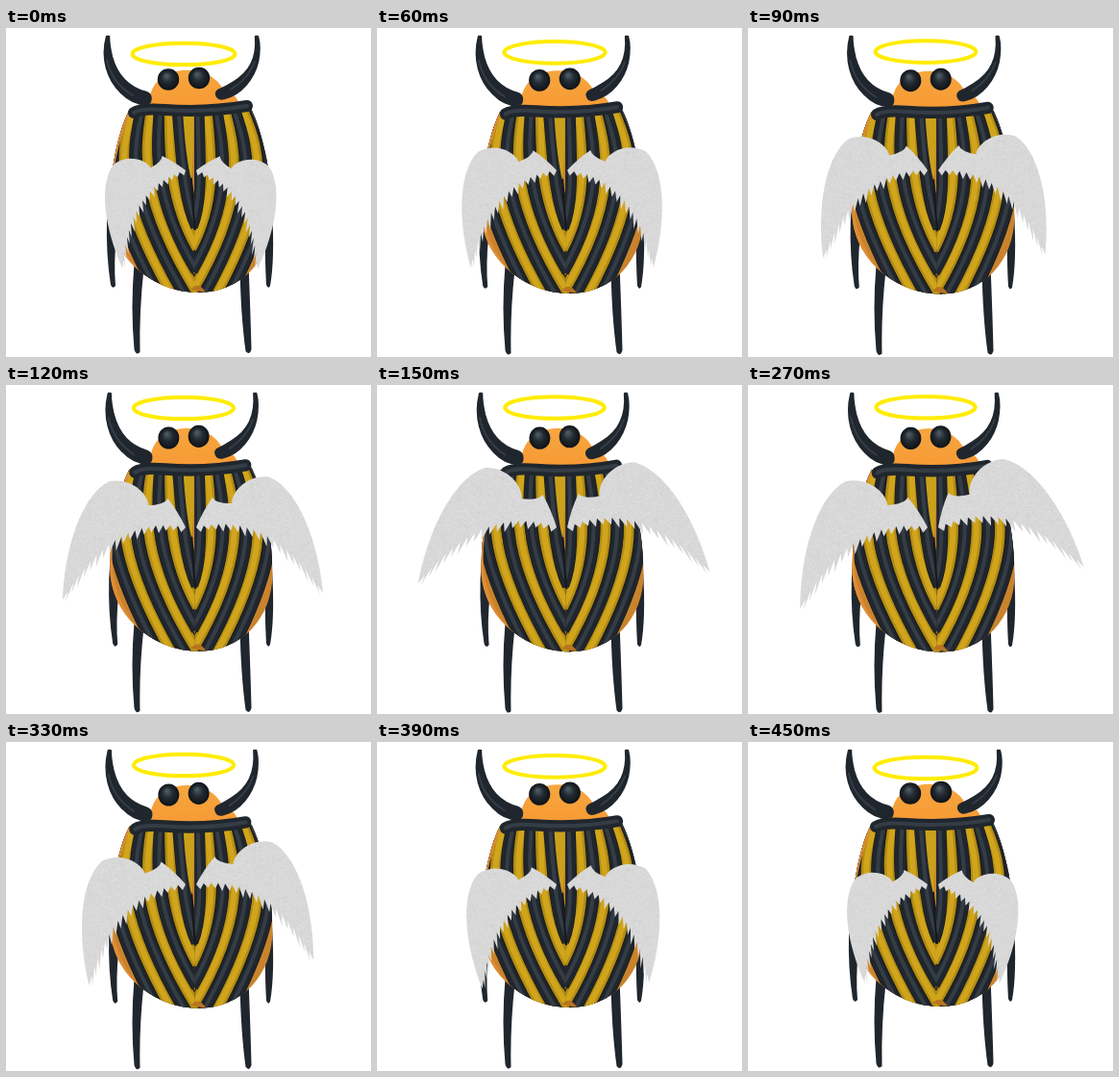
Animation of 380 by 342 pixels, one loop 480 ms. Source, as an HTML page with a canvas:

```html
<!DOCTYPE html>
<html lang="en">
<head>
<meta charset="utf-8">
<title>Winged beetle</title>
<style>
html, body { margin: 0; width: 100%; height: 100%; overflow: hidden; background: #fff; }
canvas { display: block; }
</style>
</head>
<body>
<canvas id="stage" width="380" height="342"></canvas>
<script>
const ctx = document.getElementById('stage').getContext('2d');
const LOOP = 480, STEP = 30, PEAK = 210, END = 450;
const DARK = '#20262d', SHEEN = '#343c45', ORANGE = '#f7a03c';

const mix = (a, b, u) => a + (b - a) * u;
const smooth = u => u * u * (3 - 2 * u);
const easeOut = u => 1 - (1 - u) ** 2;

function layer(draw) {
  ctx.save();
  draw();
  ctx.restore();
}

function fill(d, color) {
  ctx.fillStyle = color;
  ctx.fill(new Path2D(d));
}

function line(d, width, color) {
  ctx.lineWidth = width;
  ctx.strokeStyle = color;
  ctx.stroke(new Path2D(d));
}

function speckle() {
  const tile = document.createElement('canvas');
  tile.width = tile.height = 48;
  const c = tile.getContext('2d');
  c.fillStyle = '#d8d8d8';
  c.fillRect(0, 0, 48, 48);
  let seed = 7;
  const rnd = n => (seed = seed * 16807 % 2147483647) % n;
  for (let i = 0; i < 260; i++) {
    c.fillStyle = i % 2 ? '#dfdfdf' : '#d1d1d1';
    c.fillRect(rnd(48), rnd(48), 2, 1);
  }
  return ctx.createPattern(tile, 'repeat');
}

// Raised left wing with the shoulder at 0,0
function wingShape() {
  const path = new Path2D('M0 0 Q-3 -21 -10 -39 Q-16 -33 -34 -38 C-31 -52 -44 -76 -70 -79 C-107 -73 -145 -18 -165 39');
  const edge = u => [
    -165 * (1 - u) ** 2 - 154 * u * (1 - u),
    39 * (1 - u) ** 2 - 86 * u * (1 - u)
  ];
  const count = 19;
  for (let i = 0; i < count; i++) {
    const u = i / count, [x, y] = edge(u + .01);
    const lean = .62 * (1 - u), len = mix(18, 6, u) * (i % 3 ? .85 : 1.1);
    if (i) path.lineTo(x - Math.sin(lean) * len, y + Math.cos(lean) * len);
    path.lineTo(...edge(u + 1 / count));
  }
  path.closePath();
  return path;
}

const FEATHER = speckle(), WING = wingShape();

function wing(x, side, size, angle) {
  ctx.translate(x, 148);
  ctx.scale(side * size, size);
  ctx.rotate(-angle * Math.PI / 180);
  ctx.fillStyle = FEATHER;
  ctx.fill(WING);
}

// The left wing drops early, the right one hangs on and swings higher
function wings(t) {
  const up = t < PEAK, u = up ? t / PEAK : (t - PEAK) / (END - PEAK);
  const size = up ? mix(.715, 1, u) : mix(1, .715, u);
  const left = up ? mix(44, 0, smooth(u)) : mix(0, 44, easeOut(u));
  const right = up ? mix(45, -6, smooth(u)) : mix(-6, 45, smooth(u));
  layer(() => wing(187, 1, size, left));
  layer(() => wing(198, -1, size, right));
}

function legs(b) {
  ctx.translate(0, 2.5 * b);
  layer(() => {
    ctx.translate(3 * b, 0);
    fill('M107 165 L115 215 Q112 245 114 268 Q111 272 109 267 Q104 235 105 200Z', DARK);
  });
  fill('M270 180 L277 190 Q280 240 275 268 Q273 272 271 267 Q269 235 270 180Z', DARK);
  ctx.translate(-1.5, 0);
  fill('M135 245 L145 250 Q140 295 141 337 Q137 341 135 334 Q131 290 135 245Z', DARK);
  fill('M245 250 L254 245 Q256 295 257 334 Q255 341 251 336 Q246 300 245 250Z', DARK);
}

// Bands run from the collar and meet their mirror image on the seam
function bands(side) {
  ctx.beginPath();
  ctx.rect(side < 0 ? 0 : 196, 0, 196, 342);
  ctx.clip();
  for (let i = 6; i >= 0; i--) {
    const top = 10 + 9.3 * i, bulge = (8 + 12 * i - top / 8) / .75;
    const d = `M${189.5 + side * top} 84 C${192 + side * bulge * .92} 132 ${195 + side * bulge * 1.06} 178 ${196 - side * 3} ${206 + 23 * i}`;
    const gold = i % 2;
    line(d, 14, '#1d1e1c');
    line(d, gold ? 11 : 12, gold ? '#b38c15' : DARK);
    line(d, gold ? 6 : 4, gold ? '#d0a51c' : SHEEN);
  }
}

function body(b) {
  ctx.translate(.5 * b, 2.5 * b);
  const shell = 'M128 86 C116 110 108 150 108 190 C109 240 155 275 200 275 C245 275 277 240 277 195 C277 150 266 105 254 82Z';
  fill(shell, '#c9832c');
  ctx.clip(new Path2D(shell));
  for (const side of [-1, 1]) layer(() => bands(side));
  fill('M184 86 L195 86 Q196 125 193 158 Q187 135 184 86Z', '#cba11b');
  line('M193 156 Q194 185 197 210', 2, '#14181c');
  line('M127 88 Q104 145 109 195 Q116 235 143 259', 4, '#e08d35');
  fill('M192 272 Q200 262 208 275Z', '#b8741f');
}

function eye(x, y) {
  const g = ctx.createRadialGradient(x - 2, y - 4, 1, x, y, 11.5);
  g.addColorStop(0, '#4c5962');
  g.addColorStop(.45, '#222930');
  g.addColorStop(1, '#0e1216');
  ctx.fillStyle = g;
  ctx.beginPath();
  ctx.arc(x, y, 11.2, 0, Math.PI * 2);
  ctx.fill();
}

function head(b) {
  ctx.translate(185, 9);
  ctx.scale(1 - .03 * b, 1 + .045 * b);
  ctx.translate(-185, -9);
  const g = ctx.createLinearGradient(0, 44, 0, 82);
  g.addColorStop(0, '#f6a63f');
  g.addColorStop(1, '#f79a35');
  fill('M148 83 Q149 58 166 49 Q188 39 209 48 Q222 54 227 66 Q240 68 243 80Z', g);
  ctx.lineCap = ctx.lineJoin = 'round';
  const collar = 'M133 88 Q141 83 165 85 Q210 88 251 81';
  line(collar, 12, DARK);
  line(collar, 4, SHEEN);
  const horns = 'M105 9 C99 32 106 54 120 67 C129 76 139 79 146 79 C152 78 152 69 146 67 C127 62 115 48 110 30 Q107 18 107 9Z' +
    'M260 9 C262 30 254 47 236 57 Q228 62 221 65 C217 68 220 75 227 73 C245 69 258 52 262 35 Q265 20 262 9Z';
  fill(horns, DARK);
  line(horns, 2.5, DARK);
  line('M105 33 Q110 57 132 70 M259 35 Q252 53 234 64', 2, SHEEN);
  eye(169, 53.5);
  eye(201, 52);
}

function halo(b) {
  ctx.lineWidth = 4;
  ctx.strokeStyle = '#ffec00';
  ctx.beginPath();
  ctx.ellipse(185, 27 - 4 * b, 53.5 - 2 * b, 11.3, 0, 0, Math.PI * 2);
  ctx.stroke();
}

function draw(t) {
  const bob = Math.sin(Math.PI * t / END);
  ctx.fillStyle = '#fff';
  ctx.fillRect(0, 0, 380, 342);
  for (const part of [legs, body, head, halo]) layer(() => part(bob));
  wings(t);
}

const start = performance.now();
function tick() {
  const t = (performance.now() - start) % LOOP;
  draw(Math.floor(t / STEP) * STEP);
  requestAnimationFrame(tick);
}
tick();
</script>
</body>
</html>
```
